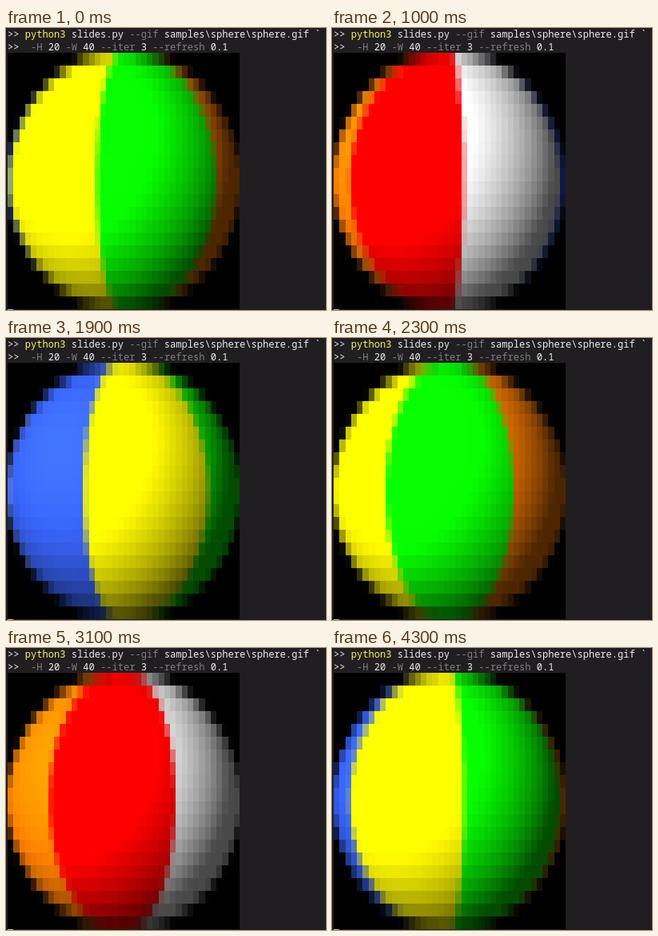
Write an HTML page with a canvas that moves like this. It is 400x353 px and loops after 4400 ms.

```html
<!DOCTYPE html>
<html lang="en">
<head>
<meta charset="utf-8">
<title>Terminal sphere</title>
<style>
  html, body { margin: 0; width: 100%; height: 100%; overflow: hidden; background: #201e20; }
  svg, canvas { position: absolute; left: 0; top: 0; }
  text { font: 12.08px "Noto Sans Mono", "DejaVu Sans Mono", monospace; fill: #ececec; white-space: pre; }
  .cmd { fill: #f7f74a; }
  .opt { fill: #807e80; }
</style>
</head>
<body>
<canvas width="400" height="353"></canvas>
<svg width="400" height="353">
  <text x="2" y="12">&gt;&gt; <tspan class="cmd">python3</tspan> slides.py <tspan class="opt">--gif</tspan> samples\sphere\sphere.gif `</text>
  <text x="2" y="28">&gt;&gt;  <tspan class="opt">-H</tspan> 20 <tspan class="opt">-W</tspan> 40 <tspan class="opt">--iter</tspan> 3 <tspan class="opt">--refresh</tspan> 0.1</text>
  <rect x="2" y="352" width="7" height="1" fill="#b8b8b8"/>
</svg>
<script>
const COLS = 40, ROWS = 20, LEFT = 2, TOP = 31, CELL_W = 7.25, CELL_H = 16.05;
const SUB_X = 6, SUB_Y = 8;
const FRAME_MS = 100, FRAMES = 44;
const CAMERA = 9, LIGHT = [-0.5, 0.33, 0.8], AMBIENT = 0.3;
// Segments eastward: green, orange, red, white, blue, yellow
const PALETTE = [[6, 252, 0], [255, 128, 0], [255, 0, 0], [242, 242, 242], [51, 90, 225], [252, 246, 0]];

const ctx = document.querySelector("canvas").getContext("2d");
const edgeX = col => Math.round(LEFT + col * CELL_W);
const edgeY = row => Math.round(TOP + row * CELL_H);

// Point on the unit sphere seen at (u, v), where the outline has radius 1
function hitSphere(u, v) {
  if (u * u + v * v >= 1) return null;
  const far = CAMERA * CAMERA - 1, s = 1 / Math.sqrt(far);
  const a = 1 + s * s * (u * u + v * v);
  const t = (CAMERA - Math.sqrt(Math.max(0, CAMERA * CAMERA - a * far))) / a;
  return [u * s * t, v * s * t, CAMERA - t];
}

function sampleCell(col, row) {
  const samples = [];
  for (let j = 0; j < SUB_Y; j++) {
    for (let i = 0; i < SUB_X; i++) {
      const u = (col + (i + 0.5) / SUB_X) / COLS * 2 - 1;
      const v = 1 - (row + (j + 0.5) / SUB_Y) / ROWS * 2;
      const p = hitSphere(u, v);
      if (!p) continue;
      const diffuse = p.reduce((sum, c, k) => sum + c * LIGHT[k], 0);
      samples.push({
        lon: Math.atan2(p[0], p[2]) * 180 / Math.PI,
        level: AMBIENT + Math.max(0, diffuse)
      });
    }
  }
  return samples;
}

const cells = [];
for (let row = 0; row < ROWS; row++) {
  for (let col = 0; col < COLS; col++) {
    const samples = sampleCell(col, row);
    if (samples.length) cells.push({ col, row, samples });
  }
}

function cellColor(samples, seam) {
  const sum = [0, 0, 0];
  for (const { lon, level } of samples) {
    const turn = ((lon - seam) % 360 + 360) % 360;
    PALETTE[Math.floor(turn / 60) % 6].forEach((c, k) => {
      sum[k] += Math.min(255, c * level);
    });
  }
  return `rgb(${sum.map(c => Math.round(c / (SUB_X * SUB_Y))).join(",")})`;
}

function fillCells(col, row, cols, rows, color) {
  const x = edgeX(col), y = edgeY(row);
  ctx.fillStyle = color;
  ctx.fillRect(x, y, edgeX(col + cols) - x, edgeY(row + rows) - y);
}

function draw(frame) {
  // The ball turns 18 degrees per frame and pauses for one frame in eleven
  const step = frame - Math.floor((frame + 3) / 11);
  const seam = -12 - 18 * step;
  fillCells(0, 0, COLS, ROWS, "#000");
  for (const { col, row, samples } of cells) {
    fillCells(col, row, 1, 1, cellColor(samples, seam));
  }
}

const start = performance.now();
let shown = -1;
function tick() {
  const frame = Math.floor((performance.now() - start) / FRAME_MS) % FRAMES;
  if (frame !== shown) draw(shown = frame);
  requestAnimationFrame(tick);
}
tick();
</script>
</body>
</html>
```
